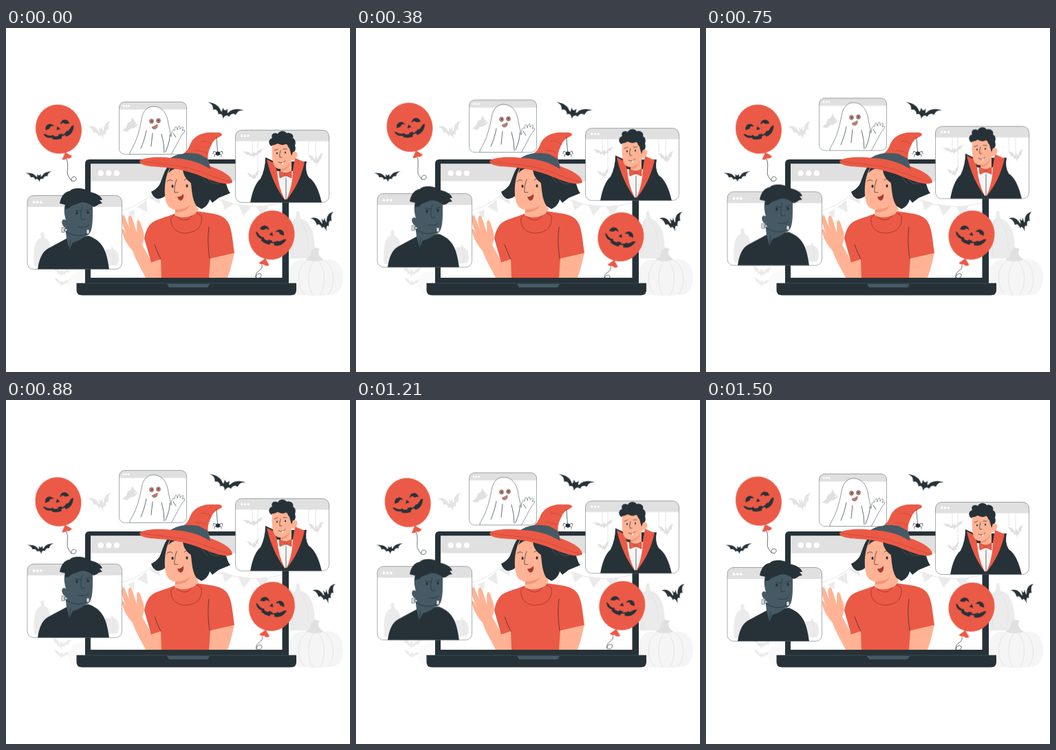
Write an HTML page that moves like this. It is 500 by 500 pixels and loops after 1540 ms.

```html
<!DOCTYPE html>
<html lang="en">
<head>
<meta charset="utf-8">
<title>Halloween video call</title>
<style>
  html, body { margin: 0; width: 100%; height: 100%; overflow: hidden; background: #fff; }
  svg { display: block; width: 100vw; height: 100vh; }
  .red { fill: #eb5a46; }
  .dark { fill: #263238; }
  .slate { fill: #455a64; }
  .skin { fill: #ffb394; }
  .white { fill: #fff; }
  .bar { fill: #e0e0e0; }
  .pale { fill: #ebebeb; }
  .faint { fill: #f5f5f5; }
  .line { fill: none; stroke: #263238; stroke-width: .7; stroke-linecap: round; stroke-linejoin: round; }
  .soft { fill: none; stroke: #e0e0e0; stroke-width: .8; }
  .frame { fill: none; stroke: #263238; stroke-width: .5; stroke-opacity: .8; }
  .float { animation: float 1540ms ease-in-out infinite; }
  .sway { transform-origin: 231px 237px; animation: sway 1540ms linear infinite; }
  .shake { animation: shake 1540ms cubic-bezier(.36, .07, .19, .97) infinite; }
  @keyframes float {
    0%, 97.4%, 100% { transform: translateY(0); }
    48.7% { transform: translateY(-5.5px); }
  }
  @keyframes sway {
    0%, 97.4%, 100% { transform: rotate(0); }
    24.35% { transform: rotate(1deg); }
    73.05% { transform: rotate(-1deg); }
  }
  @keyframes shake {
    0%, 97.4%, 100% { transform: translateX(0); }
    9.74%, 87.66% { transform: translateX(-.7px); }
    19.48%, 77.92% { transform: translateX(1.4px); }
    29.22%, 48.7%, 68.18% { transform: translateX(-2.7px); }
    38.96%, 58.44% { transform: translateX(2.7px); }
  }
</style>
</head>
<body>
<svg viewBox="0 0 500 500">
  <defs>
    <path id="bat" d="M-27-7C-17-8-9-5-6 1L-4 2-3.500-4-1-1 1-1 3.500-4 4 2 6 1C9-5 17-8 27-7C20-6 18-3 17 2C12 0 9 3 8 7C4 4 1 7 0 12C-1 7-4 4-8 7C-9 3-12 0-17 2C-18-3-20-6-27-7Z"/>
    <g id="balloon">
      <path class="red" d="M0 35L-7.500 44Q-3 46 0 44Q4 47 8 43Z"/>
      <ellipse class="red" rx="33.300" ry="36"/>
      <g class="dark" transform="translate(-.5 1.500)">
        <path id="eye" d="M-18-5C-18-13-8-16-4.500-7C-8-9-10-9-11-7C-12-5-15-6-18-5Z"/>
        <use href="#eye" transform="scale(-1 1)"/>
        <path d="M0-6L-3-1H3Z"/>
        <path d="M-23-1Q-19 0-17 3L-12 5-10 4-8 7 -3 8-2 6 3 6 4 8 9 6 11 4 13 5 17 2Q19-1 23-1C21 8 14 12 8 12L7 9 2 10 1 13C-5 13-9 12-12 10L-12 8-16 7C-19 6-22 3-23-1Z"/>
      </g>
    </g>
    <g id="dots" class="white"><circle cx="-1" r="1"/><circle r="1" cx="1.700"/><circle r="1" cx="4.400"/></g>
    <clipPath id="clipL"><rect x="31" y="243.500" width="137.500" height="107" rx="9"/></clipPath>
    <clipPath id="clipG"><rect x="164.500" y="107.500" width="98" height="76" rx="8"/></clipPath>
    <clipPath id="clipV"><rect x="333.500" y="148.500" width="136" height="105" rx="9"/></clipPath>
  </defs>

  <!-- backdrop -->
  <path class="pale" d="M413 335C411 305 413 281 421 277L422 267 426 266 428 277C445 281 451 305 448 335Z"/>
  <path class="faint" d="M411 364C410 341 424 334 437 337Q450 332 461 337C480 333 490 346 490 362C490 381 481 389 468 388Q450 391 434 388C419 390 411 380 411 364Z"/>
  <path class="bar" d="M435 337Q444 332 443 325L449 319 456 321Q450 329 462 337Q449 341 435 337Z"/>
  <path class="soft" d="M437 339C422 346 422 378 435 388M448 339C436 352 439 378 446 388M454 339C466 352 464 378 456 388M462 338C479 346 479 378 468 387"/>
  <path class="soft" d="M420 279C414 300 416 320 418 333M428 279C438 295 440 310 439 322"/>
  <use href="#bat" transform="translate(138 148) rotate(-14) scale(.65 1.250)" fill="#e4e4e4"/>
  <g class="pale">
    <use href="#bat" transform="translate(81 353) rotate(6) scale(.6 .8)"/>
    <use href="#bat" transform="translate(81 369) rotate(8) scale(.48 .6)"/>
  </g>
  <path d="M116 352C96 353 90 362 91 374C92 384 97 389 116 388Z" fill="#fafafa"/>

  <!-- laptop -->
  <path class="dark" d="M115 372V197Q115 191 121 191H405Q411 191 411 197V372Z"/>
  <path class="white" d="M123 197.500H401.500V363H123Z"/>
  <path class="bar" d="M123 197.500H401.500V222.500H123Z"/>
  <use href="#dots" transform="translate(142 211) scale(4.300)"/>
  <path class="dark" d="M102.500 371H422V381Q422 388.500 414 388.500H110.500Q102.500 388.500 102.500 381Z"/>
  <path d="M102.500 371H422" stroke="#455a64" stroke-width=".6"/>
  <path class="slate" d="M234 372H296L293 377H237Z"/>

  <!-- bunting -->
  <path class="soft" d="M123 262Q172 284 232 224M300 246Q350 268 401 254"/>
  <g class="pale">
    <path d="M126 264L137 268 129 276ZM139 269L149 271 143 281ZM153 271L161 272 157 283ZM164 272L173 270 170 283ZM177 268L187 264 186 276ZM191 260L204 250 206 268ZM208 247L221 234 224 256Z"/>
    <path d="M313 249L331 255 318 265ZM337 256L357 259 345 273ZM363 259L382 259 372 273Z"/>
  </g>

  <!-- witch -->
  <path class="skin" d="M203 363C196 349 188 336 184 324C177 316 170 305 169 296C168 291 171 291 173 296L176 301C172 293 167 283 169 275C170 270 173 273 174 278L181 294C178 286 176 277 179 273C182 270 184 278 186 284L190 297C191 290 189 284 191 280C194 277 196 284 198 291C202 299 201 308 198 315L212 341 226 335 230 363Z"/>
  <path class="skin" d="M296 332L332 326C329 341 326 352 322 363H294Z"/>
  <path class="red" d="M245 270C230 276 217 278 210 285C205 290 202 299 201 306L211 341 225 336 226 363H295L297 335 332 327C330 314 329 300 326 290C322 277 315 273 302 270L276 266Z"/>
  <path class="line" d="M295 289Q292 311 296 335M216 315Q220 326 225 336"/>
  <path d="M240 276C238 291 250 299 262 298C276 297 286 290 284 273L274 267Q263 289 245 271Z" fill="#eb5a46" stroke="#a83b30" stroke-width="1"/>
  <path class="dark" d="M237 199C229 208 228 218 223 228Q218 235 211 238Q213 245 219 248C225 249 231 245 234 242L262 250 284 263C290 261 295 255 296 249L300 254 309 247 326 240C320 233 322 223 313 217L282 199Z"/>
  <path class="skin" d="M239 202C232 213 230 230 231 243C232 257 237 263 246 264L245 272C252 277 268 276 276 269L280 263C274 256 271 247 271 239C272 230 265 219 263 203Z"/>
  <path class="dark" d="M236 211C243 203 253 203 257 204C257 215 264 222 269 225C270 238 271 246 274 249L287 225 270 200H240Z"/>
  <path d="M246 264Q260 264 268 257Q262 269 246 268Z" fill="#f39678"/>
  <path d="M281 209Q290 213 294 220Q299 228 310 226M283 211Q285 220 293 226" fill="none" stroke="#607078" stroke-width=".5"/>
  <g class="dark"><ellipse cx="242" cy="230" rx="1.500" ry="2.300"/><ellipse cx="263" cy="229.500" rx="1.500" ry="2.300"/></g>
  <path class="line" d="M248 220Q244 231 245 239L250 239M234 223Q238 219 242 222M259 221Q264 217 269 222" stroke-width="1"/>
  <path d="M249 245Q254 246 258 241Q259 249 254 251Q250 250 249 245Z" fill="#a83b30"/>
  <path class="red" d="M194 193C202 187 225 187 242 189C252 187 263 182 267 171C271 158 285 150 303 152Q313 151 314 155C313 159 304 158 299 169C292 182 292 191 297 201C315 207 329 216 329 224C323 230 304 224 285 216C264 207 242 203 222 202C208 201 194 200 194 193Z"/>
  <path d="M194 193C218 198 251 198 277 207C300 215 315 222 329 224" fill="none" stroke="#c2432f" stroke-width=".6"/>
  <path class="slate" d="M239 189C253 180 268 181 280 183L293 190 297 205C279 194 260 189 239 189Z"/>
  <path d="M283 165Q291 163 298 169M275 178Q286 178 292 182" fill="none" stroke="#c2432f" stroke-width=".7"/>
  <path class="line" d="M306 159L307.500 180M308 182L302 179 301 183M308 183L303 184 303 187M308 182L314 179 315 183M308 183L313 184 313 187"/>
  <ellipse class="dark" cx="308" cy="182.500" rx="3.300" ry="2.900"/>

  <!-- bandaged friend -->
  <g class="float">
    <g clip-path="url(#clipL)">
      <path class="white" d="M31 243H169V351H31Z"/>
      <path class="bar" d="M31 243H169V260H31Z"/>
      <use href="#dots" transform="translate(42.500 253.200) scale(1.900)"/>
      <path class="pale" d="M41 346C39 320 43 306 51 305L50 298 55 296 56 305C65 307 67 324 64 346Z"/>
      <path class="pale" d="M139 345C138 322 147 320 152 322L154 317 157 322C165 324 166 340 161 345Z"/>
      <path class="soft" d="M148 323Q143 334 147 345M155 323Q160 334 155 345"/>
      <path class="dark" d="M46 351C48 337 52 325 62 320L88 306 120 302C138 309 146 319 150 351Z"/>
    </g>
    <path class="slate" d="M87 254C83 262 85 272 87 279C80 275 79 286 86 290L88 306 92 322 97 312Q108 309 116 302C125 301 126 286 126 270V252L108 246Z"/>
    <path class="dark" d="M78 255C80 243 87 237 93 237C95 232 114 231 121 238C130 240 138 243 140 250L136 250 140 255C133 255 134 259 127 260Q116 251 107 254C99 258 95 257 92 262L86 263 86 257Z"/>
    <path class="line" d="M111 260Q107 271 110 279L115 278M101 265L109 266M116 265L123 263M105 289Q114 291 120 287M87 296Q103 306 117 299M72 325Q74 338 72 350M94 308L92 320" stroke-width="1"/>
    <g class="dark"><ellipse cx="103" cy="269" rx="1.700" ry="2.300"/><ellipse cx="119" cy="268" rx="1.700" ry="2.300"/></g>
    <g fill="#e0e0e0" stroke="#263238" stroke-width=".5"><path d="M81 290H85V297H81ZM85 292H89V295H85ZM117 293H121V299H117Z"/></g>
    <rect class="frame" x="31" y="243.500" width="137.500" height="107" rx="9"/>
  </g>

  <!-- ghost -->
  <g class="float">
    <g clip-path="url(#clipG)">
      <path class="white" d="M164 107H263V184H164Z"/>
      <path class="bar" d="M164 107H263V118.500H164Z"/>
      <use href="#dots" transform="translate(172.500 113.200) scale(1.400)"/>
      <path class="bar" d="M169 149L175 144 177 138 181 136 184 130 187 136 190 138 186 141 193 139 187 145 180 147 176 151Z"/>
      <path d="M180 181C191 163 194 148 197 133C199 119 207 114 214 114C227 114 234 124 236 139L240 158C240 150 243 146 245 149C246 142 248 141 249 148C251 141 253 140 253 147C257 142 259 143 256 149C261 147 261 150 256 155C252 161 246 174 240 184H180Z" fill="#fff" stroke="#263238" stroke-width=".5"/>
      <path class="line" d="M204 149Q201 164 196 175M213 153L211 172M226 154Q230 167 230 181M238 155Q239 163 232 180M243 153L247 159" stroke-width=".6"/>
    </g>
    <g fill="#c97a68" stroke="#455a64" stroke-width=".5">
      <ellipse cx="211.500" cy="135.500" rx="3" ry="3.300"/><ellipse cx="221.500" cy="134.700" rx="3" ry="3.300"/>
      <path d="M212 144Q217 142 220 140Q221 146 216 147Q213 147 212 144Z"/>
    </g>
    <g class="dark"><circle cx="212" cy="135.500" r="1"/><circle cx="221.500" cy="134.500" r="1"/></g>
    <rect class="frame" x="164.500" y="107.500" width="98" height="76" rx="8"/>
  </g>

  <!-- vampire -->
  <g class="float">
    <g clip-path="url(#clipV)">
      <path class="white" d="M333 148H470V254H333Z"/>
      <path class="bar" d="M333 148H470V164.500H333Z"/>
      <use href="#dots" transform="translate(344.500 156.700) scale(1.750)"/>
      <path class="soft" d="M358 164V182M366 164V210M440 164V184M450 164V190"/>
      <g class="bar">
        <use href="#bat" transform="translate(360 182) rotate(-8) scale(.62 .6)"/>
        <use href="#bat" transform="translate(360 214) rotate(-14) scale(.36 .7)"/>
        <use href="#bat" transform="translate(451 190) rotate(-8) scale(.45 .9)"/>
      </g>
      <path class="dark" d="M355 254C358 238 362 226 370 219Q377 205 377 188L390 194H420L437 194Q434 207 440 217C449 223 455 236 459 254Z"/>
      <path class="red" d="M379 191L389 196 396 212 406 251Q387 226 379 191ZM420 189L434 195Q427 227 407 251L416 212Z"/>
      <path d="M394 208H417Q416 232 408 249H405Q396 232 394 208Z" fill="#f5f5f5"/>
      <path class="line" d="M407 218V250"/>
    </g>
    <path class="skin" d="M387 171C386 183 387 192 389 198Q391 205 399 205V210L407 215 415 209V192C425 192 426 178 419 180L416 166H388Z"/>
    <path d="M399 205Q408 204 413 196Q410 207 399 208Z" fill="#f39678"/>
    <path class="dark" d="M386 172C380 168 382 161 387 160C384 154 391 151 395 154C398 148 406 149 408 153C414 151 419 156 417 160C422 163 421 168 420 171C422 176 420 181 417 180L415 186 412 175C409 173 410 168 406 169C401 172 397 168 394 168C391 171 387 169 386 172Z"/>
    <g class="dark"><ellipse cx="394" cy="182" rx="1" ry="1.500"/><ellipse cx="406" cy="181" rx="1" ry="1.500"/></g>
    <path class="line" d="M399 178Q397 184 398 188L401 188M390 178L395 176M403 176L408 176M396 195Q402 198 406 193" stroke-width=".9"/>
    <path d="M401 196L402 199 404 195Z" fill="#fff"/>
    <path d="M397 208L405 211H408L415 208V218L408 215H405L398 218Z" fill="#eb5a46" stroke="#a83b30" stroke-width=".6"/>
    <circle cx="406.500" cy="213" r="2.200" fill="#eb5a46" stroke="#a83b30" stroke-width=".5"/>
    <rect class="frame" x="333.500" y="148.500" width="136" height="105" rx="9"/>
  </g>

  <g class="sway">
    <path class="line" d="M88 190C93 202 85 211 93 219C96 225 103 223 102 218C99 214 94 217 95 222"/>
    <path class="line" d="M372 345C374 353 362 352 363 362C367 366 372 362 371 358C367 355 363 359 363 363"/>
    <use href="#balloon" transform="translate(76.500 147) rotate(-16)"/>
    <use href="#balloon" transform="translate(386 301) rotate(15)"/>
  </g>

  <g class="shake dark">
    <use href="#bat" transform="translate(318 120.500) rotate(13)"/>
    <use href="#bat" transform="translate(48 215) rotate(-4) scale(.72)"/>
    <use href="#bat" transform="translate(462 281) rotate(-16) scale(.65 1.300)"/>
  </g>
</svg>
</body>
</html>
```
